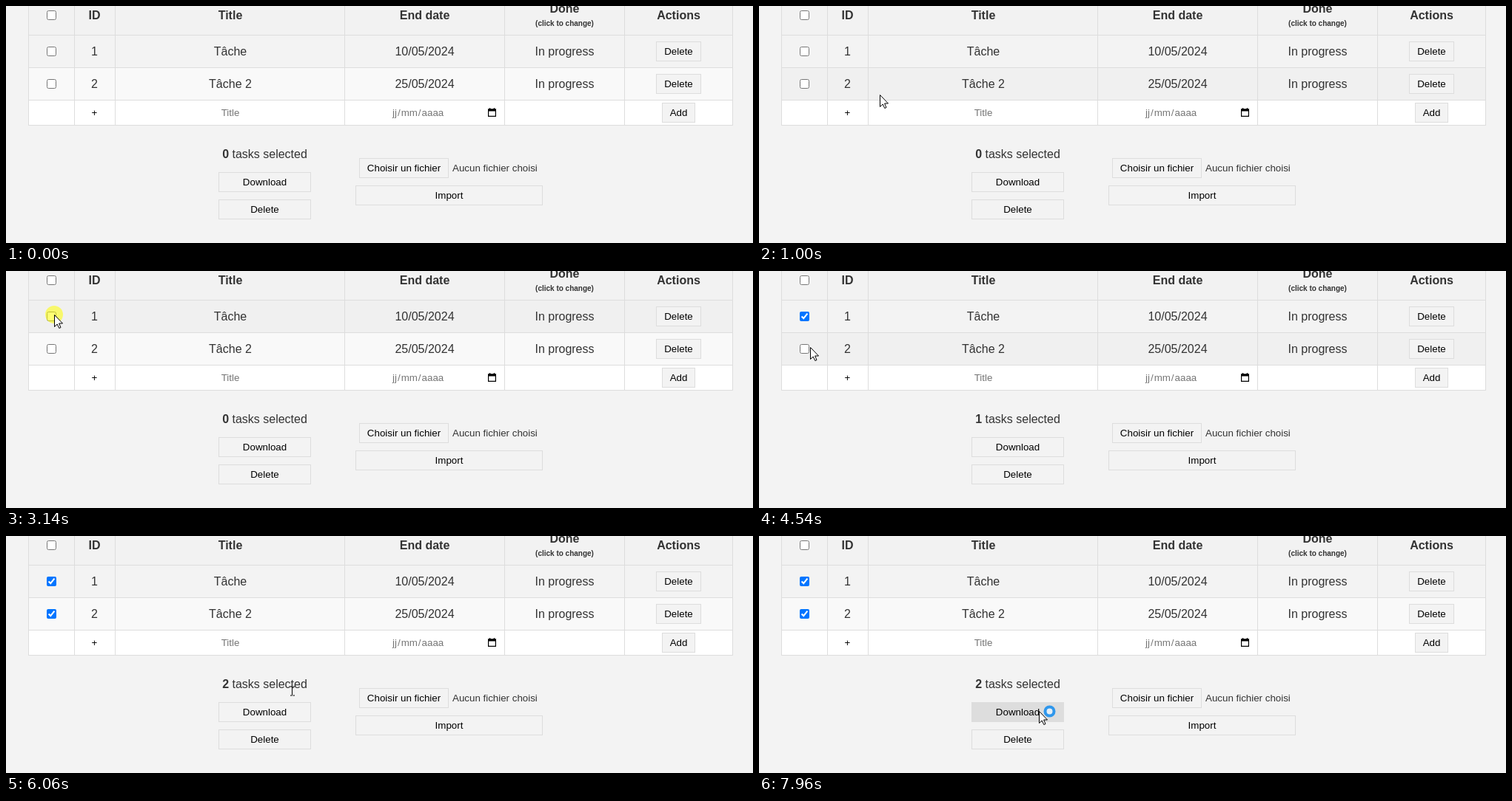
Write an HTML page that moves like this. It is 1009 by 321 pixels and loops after 7990 ms.

```html
<!DOCTYPE html>
<html lang="en">
<head>
<meta charset="utf-8">
<title>Task list</title>
<style>
  html, body { margin: 0; width: 100%; height: 100%; overflow: hidden; background: #f3f3f3; }
  svg { position: absolute; left: 0; top: 0; }
  input { position: absolute; left: 55px; width: 13px; height: 13px; margin: 0; pointer-events: none; }
  text { font: 16px Arial, "Liberation Sans", sans-serif; fill: #333; white-space: pre; }
  .bold { font-weight: bold; }
  .small { font-size: 13.333px; }
  .tiny { font-size: 10px; font-weight: bold; }
  .label { fill: #000; }
  .hint { fill: #757575; }
</style>
</head>
<body>
<svg id="page" width="1009" height="321"></svg>
<input type="checkbox" style="top:6px" tabindex="-1">
<input type="checkbox" style="top:55px" tabindex="-1">
<input type="checkbox" style="top:99px" tabindex="-1">
<svg id="overlay" width="1009" height="321">
  <circle id="click" r="12" fill="#ff0" fill-opacity=".55"/>
  <g id="arrow">
    <path d="M.5 .5V16.5L4.2 13L6.8 18.5L9 17.5L6.6 12H11.5Z" fill="#fff" stroke="#000"/>
    <circle id="busy" cx="14.5" cy=".5" r="6" fill="#e4eef6" stroke="#2f97ec" stroke-width="4"/>
  </g>
  <path id="beam" d="M-3 -6h2.5M.5 -6H3M-.5 -5.5V5.5M-3 6h2.5M.5 6H3" fill="none" stroke="#000"/>
</svg>
<script>
const LOOP = 7990;
const $ = id => document.getElementById(id);
const page = $('page');
const boxes = document.querySelectorAll('input');

function add(tag, attrs, content = '') {
  const el = document.createElementNS('http://www.w3.org/2000/svg', tag);
  for (const k in attrs) el.setAttribute(k, attrs[k]);
  el.innerHTML = content;
  return page.appendChild(el);
}
const rect = (x, y, width, height, fill) => add('rect', { x, y, width, height, fill });
const text = (x, y, content, cls = '', anchor = 'middle') =>
  add('text', { x, y, class: cls, 'text-anchor': anchor }, content);

function button(x, y, width, label) {
  const face = add('rect', { x: x + .5, y: y + .5, width: width - 1, height: 26, fill: '#f3f3f3', stroke: '#ddd' });
  text(x + width / 2, y + 18, label, 'small label');
  return face;
}

// Table
rect(30, 0, 952, 39, '#f2f2f2');
const rows = [rect(30, 40, 952, 43), rect(30, 84, 952, 43)];
const rowFill = ['#f3f3f3', '#f9f9f9'];
rect(30, 128, 952, 33, '#fff');
for (const y of [39, 83, 127, 161]) rect(30, y, 952, 1, '#ddd');
for (const x of [30, 92, 147, 457, 673, 835, 981]) rect(x, 0, 1, 162, '#ddd');

const cols = [119.5, 303, 565.5, 754.5, 908.5];
['ID', 'Title', 'End date', 'Done', 'Actions'].forEach((s, i) =>
  text(cols[i], s === 'Done' ? 9 : 18, s, 'bold'));
text(cols[3], 27, '(click to change)', 'tiny');
[['1', 'Tâche', '10/05/2024'], ['2', 'Tâche 2', '25/05/2024']].forEach((row, r) => {
  [...row, 'In progress'].forEach((s, i) => text(cols[i], 67 + 44 * r, s));
  button(878, 48 + 44 * r, 61, 'Delete');
});
text(cols[0], 149, '+', 'small label');
text(cols[1], 149, 'Title', 'small hint');
text(522, 149, 'jj/mm/aaaa', 'small hint', 'start').setAttribute('dx', '0 0 1 1 0 1 1');
add('path', { d: 'M651.6 140h9.8v9.4h-9.8z', fill: 'none', stroke: '#000', 'stroke-width': 1.2 });
add('path', { d: 'M651 139.5h11v3h-11zM653 138h1.2v2h-1.2zM658.8 138h1.2v2h-1.2z' });
button(886, 131, 45, 'Add');

// Controls below the table
const count = text(349.5, 206, '');
const download = button(287, 225, 125, 'Download');
button(287, 262, 125, 'Delete');
button(477, 206, 121, 'Choisir un fichier');
text(603, 224, 'Aucun fichier choisi', 'small', 'start');
button(472, 243, 253, 'Import');

// Pointer path: time, x, y
const path = [
  [200, 855, 306], [350, 640, 240], [500, 410, 180], [700, 235, 138], [900, 172, 122],
  [1000, 163, 120], [1400, 120, 92], [1700, 98, 78], [1900, 89, 73], [2560, 69, 63],
  [2660, 69, 63], [3060, 65, 59], [3220, 65, 59], [3410, 67, 58], [3510, 67, 58],
  [3800, 71, 75], [4220, 71, 99], [4540, 69, 103], [4740, 67, 105], [5150, 67, 105],
  [5400, 140, 130], [5700, 310, 180], [5940, 381, 201], [6060, 387, 210],
  [6400, 386, 228], [6740, 384, 237], [6840, 384, 237], [7280, 375, 242],
  [7510, 375, 242], [7700, 378, 237], [LOOP, 378, 237]
];
const clicks = [[3140, 3220], [4980, 5060], [7720, 7800]];

function pointerAt(t) {
  const i = Math.max(1, path.findIndex(k => k[0] > t));
  const [t0, x0, y0] = path[i - 1], [t1, x1, y1] = path[i];
  const p = Math.max(0, (t - t0) / (t1 - t0));
  return [Math.round(x0 + (x1 - x0) * p), Math.round(y0 + (y1 - y0) * p)];
}
const show = (el, on) => el.setAttribute('visibility', on ? 'visible' : 'hidden');

function draw(t) {
  const [x, y] = pointerAt(t);
  const visible = t >= 200;
  const overText = x > 291 && x < 408 && y > 190 && y < 214;
  for (const id of ['click', 'arrow', 'beam']) $(id).setAttribute('transform', `translate(${x} ${y})`);
  show($('click'), clicks.some(([a, b]) => t >= a && t < b));
  show($('arrow'), visible && !overText);
  show($('beam'), visible && overText);
  show($('busy'), t >= 7960);

  rows.forEach((row, i) => {
    const top = 40 + 44 * i;
    row.setAttribute('fill', visible && y >= top && y < top + 44 ? '#f0f0f0' : rowFill[i]);
    boxes[i + 1].checked = t >= clicks[i][1];
  });
  const over = x >= 287 && x < 412 && y >= 225 && y < 252;
  download.setAttribute('fill', over ? '#ddd' : '#f3f3f3');
  const n = (t >= clicks[0][1]) + (t >= clicks[1][1]);
  count.innerHTML = `<tspan class="bold">${n}</tspan> tasks selected`;
}

const start = performance.now();
function tick() {
  draw((performance.now() - start) % LOOP);
  requestAnimationFrame(tick);
}
tick();
</script>
</body>
</html>
```
